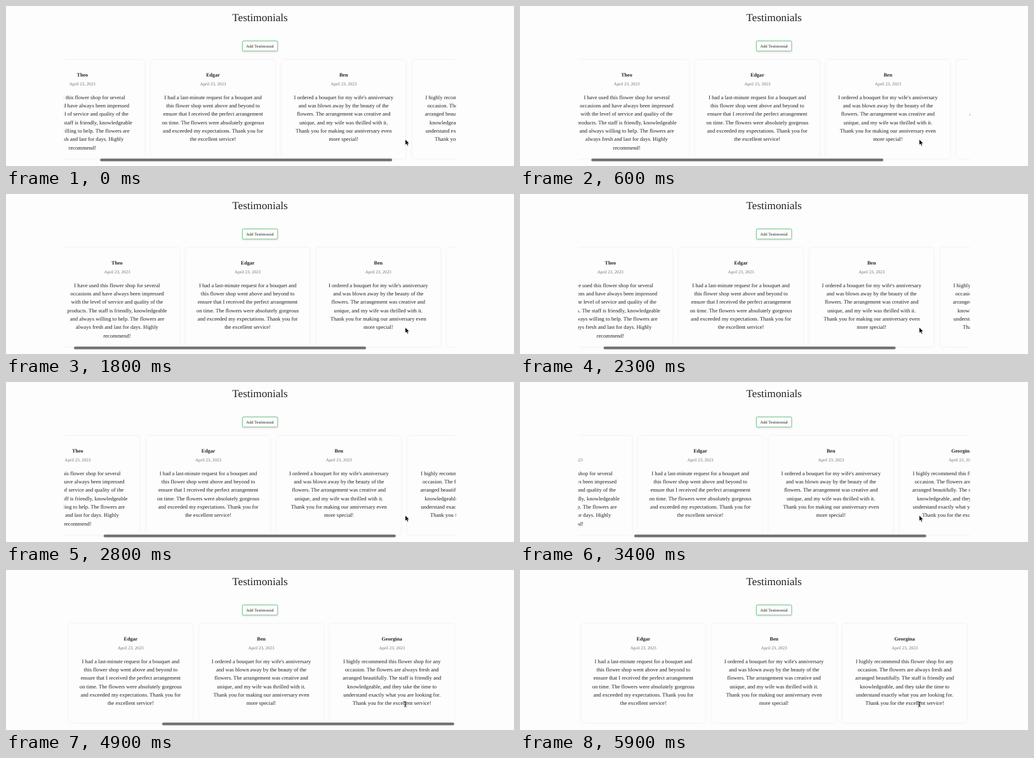
Animation of 800 by 254 pixels, one loop 6.3 s. Source, as an HTML page:

```html
<!DOCTYPE html>
<html lang="en">
<head>
<meta charset="utf-8">
<title>Testimonials</title>
<style>
  html, body { margin: 0; width: 100%; height: 100%; overflow: hidden; background: #fdfdfd; }
  svg { display: block; width: 100vw; height: 100vh; }
  text {
    font-family: "Liberation Serif", "Times New Roman", serif;
    text-anchor: middle;
    text-rendering: geometricPrecision;
    fill: #222;
  }
  .title { font-size: 17.2px; }
  .label { font-size: 6.5px; }
  .name { font-size: 8.1px; font-weight: bold; }
  .date { font-size: 7px; fill: #707070; }
  .body { font-size: 8.58px; }
</style>
</head>
<body>
<svg viewBox="0 0 800 254">
  <defs>
    <clipPath id="view"><rect x="91.5" y="80" width="617" height="168"/></clipPath>
    <filter id="soft" x="-10%" y="-10%" width="120%" height="120%">
      <feDropShadow dx="0" dy="0" stdDeviation="2.2" flood-color="#000" flood-opacity=".07"/>
    </filter>
    <filter id="lift" x="-20%" y="-50%" width="140%" height="220%">
      <feDropShadow dx="0" dy="1.5" stdDeviation="1.8" flood-color="#000" flood-opacity=".1"/>
    </filter>
  </defs>
  <rect width="800" height="254" fill="#fdfdfd"/>
  <text class="title" x="400" y="24">Testimonials</text>
  <rect x="372.3" y="55.5" width="55.5" height="16.1" rx="1.5" fill="#fdfdfd" stroke="#58b673" stroke-width=".85" filter="url(#lift)"/>
  <text class="label" x="400" y="65.9">Add Testimonial</text>
  <g clip-path="url(#view)"><g id="track"></g></g>
  <rect id="bar" y="242.3" width="460" height="4.3" rx="2.1" fill="#707070"/>
  <path id="arrow" d="M628.8 211.8V220.6L630.8 218.8L632.2 222L633.7 221.4L632.3 218.2H635Z"
        fill="#000" stroke="#fff" stroke-width=".5"/>
  <path id="beam" d="M627.2 209.2Q628.9 209.2 628.9 210.6V215.8Q628.9 217.2 627.2 217.2M630.6 209.2Q628.9 209.2 628.9 210.6M628.9 215.8Q628.9 217.2 630.6 217.2M627.9 214.2H629.9"
        fill="none" stroke="#222" stroke-width=".9" stroke-linecap="round"/>
</svg>
<script>
const LOOP = 6300, STEP = 100;
const FIRST = 194.3, PITCH = 205.7, CARD = 194.6;
const DATE = "April 23, 2023";

const cards = [
  ["Theo", "I have used this flower shop for several|occasions and have always been impressed|with the level of service and quality of the|products. The staff is friendly, knowledgeable|and always willing to help. The flowers are|always fresh and last for days. Highly|recommend!"],
  ["Edgar", "I had a last-minute request for a bouquet and|this flower shop went above and beyond to|ensure that I received the perfect arrangement|on time. The flowers were absolutely gorgeous|and exceeded my expectations. Thank you for|the excellent service!"],
  ["Ben", "I ordered a bouquet for my wife's anniversary|and was blown away by the beauty of the|flowers. The arrangement was creative and|unique, and my wife was thrilled with it.|Thank you for making our anniversary even|more special!"],
  ["Georgina", "I highly recommend this flower shop for any|occasion. The flowers are always fresh and|arranged beautifully. The staff is friendly and|knowledgeable, and they take the time to|understand exactly what you are looking for.|Thank you for the excellent service!"]
];

// Scroll keys: time in ms, offset in px, speed in px per ms
const keys = [
  [0, 74, -.08], [600, 26.3, -.078], [1000, 0, 0], [1400, 0, 0],
  [1800, 19.4, .065], [2300, 52, .062], [3400, 116, .06],
  [4300, 172, .06], [5000, 205.7, .012]
];

const byId = id => document.getElementById(id);
const track = byId("track"), bar = byId("bar"), arrow = byId("arrow"), beam = byId("beam");

function add(tag, attrs, text = "") {
  const el = document.createElementNS("http://www.w3.org/2000/svg", tag);
  for (const k in attrs) el.setAttribute(k, attrs[k]);
  el.textContent = text;
  track.appendChild(el);
}

cards.forEach(([name, body], i) => {
  const x = FIRST + i * PITCH;
  add("rect", { x: x - CARD / 2, y: 86, width: CARD, height: 156, rx: 3, fill: "#fdfdfd", filter: "url(#soft)" });
  add("text", { class: "name", x, y: 112.4 }, name);
  add("text", { class: "date", x, y: 126.2 }, DATE);
  body.split("|").forEach((line, n) =>
    add("text", { class: "body", x, y: 147.6 + n * 13.35 }, line));
});

// Cubic Hermite curve through the scroll keys
function scrollAt(t) {
  const last = keys[keys.length - 1];
  if (t >= last[0]) return last[1];
  const i = keys.findIndex(k => k[0] > t);
  const [t0, a, va] = keys[i - 1], [t1, b, vb] = keys[i];
  const d = t1 - t0, u = (t - t0) / d, u2 = u * u, u3 = u2 * u;
  return (2 * u3 - 3 * u2 + 1) * a + (u3 - 2 * u2 + u) * d * va
       + (3 * u2 - 2 * u3) * b + (u3 - u2) * d * vb;
}

function draw(time) {
  const t = Math.floor((time % LOOP) / STEP) * STEP;
  const s = scrollAt(t);
  track.setAttribute("transform", `translate(${-s} 0)`);
  bar.setAttribute("x", 92.4 + s * .7535);
  bar.setAttribute("opacity", Math.min(1, Math.max(0, (5900 - t) / 400)));
  const overText = t >= 3500;
  arrow.setAttribute("visibility", overText ? "hidden" : "visible");
  beam.setAttribute("visibility", overText ? "visible" : "hidden");
}

const start = performance.now();
function tick() {
  draw(performance.now() - start);
  requestAnimationFrame(tick);
}
draw(0);
requestAnimationFrame(tick);
</script>
</body>
</html>
```
